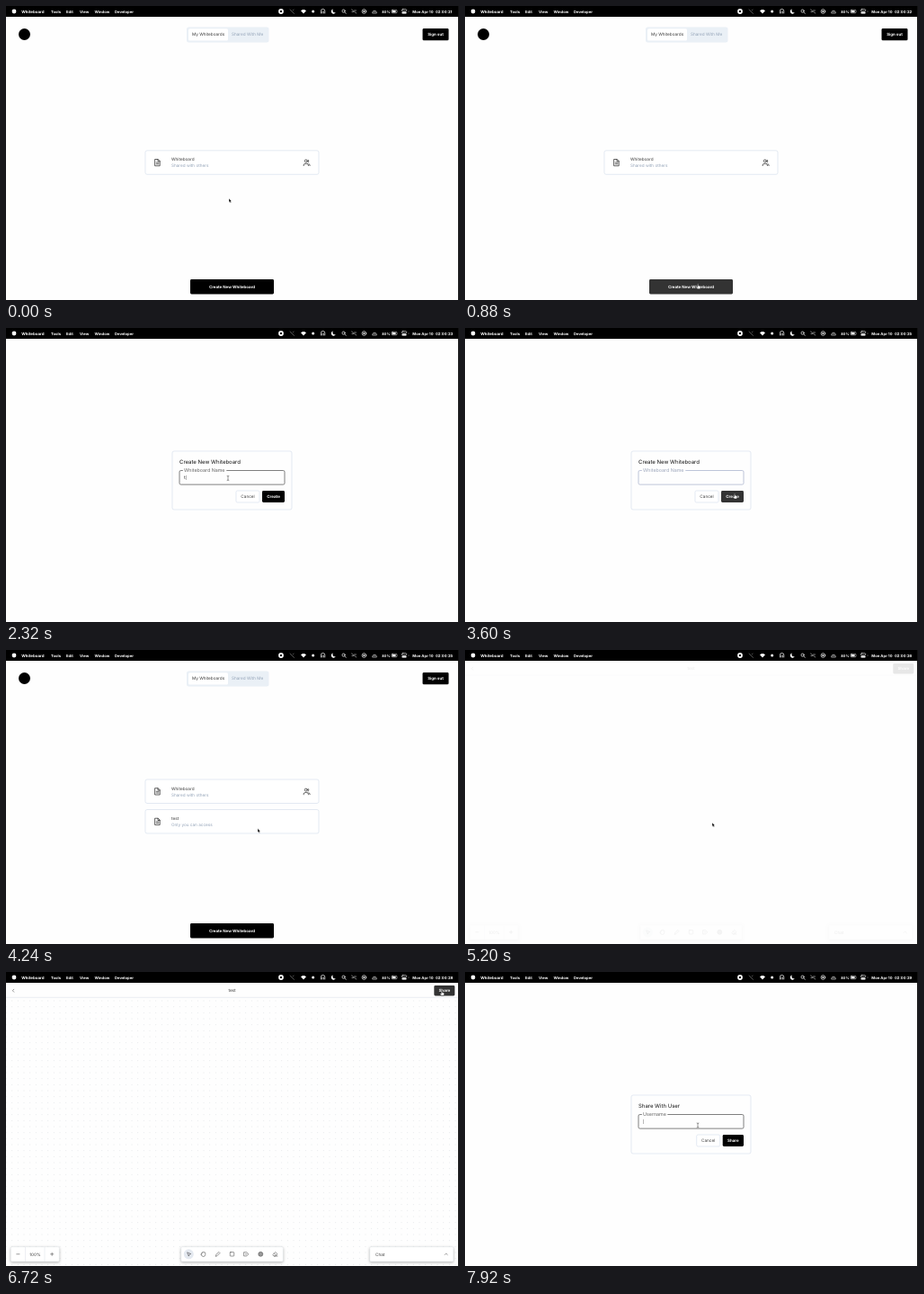
An HTML page that plays this animation: 504 by 327 pixels, repeating every 8 s.

```html
<!DOCTYPE html>
<html lang="en">
<head>
<meta charset="utf-8">
<title>Whiteboard</title>
<style>
html, body { margin: 0; width: 100%; height: 100%; overflow: hidden; background: #fefefe; }
svg { display: block; width: 504px; height: 327px; }
text {
  font-family: Inter, "Open Sans", sans-serif; font-size: 4.67px; fill: #3c3c3c;
  white-space: pre; text-rendering: geometricPrecision;
}
.bold { font-weight: 700; }
.mid { text-anchor: middle; }
.menu text { font-size: 4.2px; fill: #fff; font-weight: 650; }
.menu .app { font-weight: 700; font-size: 4.4px; }
.line { fill: none; stroke: #222; stroke-width: .7; stroke-linecap: round; stroke-linejoin: round; }
.menu .line { stroke: #fff; }
.thin .line { stroke: #333; stroke-width: .5; }
.soft { fill: #94a3b8; }
.card { fill: #fff; stroke: #d9e1ee; stroke-width: .7; }
.panel { fill: #fff; stroke: #dfe2e7; stroke-width: .4; filter: drop-shadow(0 1px 1.7px rgba(0,0,0,.3)); }
</style>
</head>
<body>
<svg id="stage" viewBox="0 0 504 327"></svg>
<script>
const LOOP = 8000;
const GRID = 20 / 3;
const text = (x, y, s, attrs = '') => `<text x="${x}" y="${y}" ${attrs}>${s}</text>`;
const rect = (x, y, w, h, r, attrs = '') =>
  `<rect x="${x}" y="${y}" width="${w}" height="${h}" rx="${r}" ${attrs}/>`;
const dot = (x, y, r, attrs = '') => `<circle cx="${x}" cy="${y}" r="${r}" ${attrs}/>`;
const line = (d, attrs = '') => `<path class="line" d="${d}" ${attrs}/>`;
const group = (id, body, attrs = '') => `<g id="${id}" ${attrs}>${body}</g>`;

const button = (id, x, y, w, h, label, size = 4.5) =>
  rect(x, y, w, h, 1.4, `id="${id}" fill="#000"`) +
  text(x + w / 2, y + h / 2 + 1.6, label, `class="bold mid" style="fill:#fff;font-size:${size}px"`);

const menu = () => rect(0, 0, 504, 12, 0, 'fill="#000"') +
  dot(9, 6, 2.4, 'fill="#fff"') +
  text(17.3, 7.6, 'Whiteboard', 'class="app"') +
  [[50, 'Tools'], [67, 'Edit'], [82, 'View'], [98.5, 'Window'], [121, 'Developer']]
    .map(([x, s]) => text(x, 7.6, s)).join('') +
  dot(306, 6, 2.9, 'fill="#fff"') + rect(305, 5, 2, 2, .3, 'fill="#000"') +
  line('M316 4l4.5 4.5M320 4l-1 1', 'opacity=".45"') +
  '<path fill="#fff" d="M331 8.6l-3-3.4q3-2.4 6 0z"/>' +
  dot(341.7, 6, 1.5, 'fill="#fff"') +
  line('M350.4 8V5.6a2.2 2.2 0 0 1 4.4 0V8M351.8 8V6M353.4 8V6') +
  '<path fill="#fff" d="M363.8 3.6a2.6 2.6 0 1 0 3 3.5a2.4 2.4 0 0 1-3-3.5z"/>' +
  dot(375.6, 5.6, 1.6, 'class="line"') + line('M376.9 6.9l1.3 1.4') +
  line('M384.6 4l5.2 4M385 6.5h1.5M387.5 5h2', 'opacity=".7"') +
  dot(398.4, 6, 2.3, 'class="line"') + dot(398.4, 6, 1, 'fill="#fff"') +
  line('M407.6 7.6a2.4 2.4 0 0 1 4.8 0zM410 7v-1', 'opacity=".8"') +
  text(418.3, 7.5, '80%', 'style="font-size:3.9px"') +
  rect(429, 4.3, 6, 3.5, 1, 'class="line" style="stroke-width:.5"') +
  rect(429.6, 4.9, 4, 2.3, .5, 'fill="#fff"') +
  rect(440.3, 3.6, 5.4, 2.2, 1.1, 'class="line" style="stroke-width:.6"') +
  rect(440.3, 6.4, 5.4, 2.2, 1.1, 'fill="#fff"') + dot(448, 6, .5, 'fill="#aaa"') +
  text(452.3, 7.6, 'Mon Apr 10') + text(478, 7.6, '', 'id="clock"');

const boardCard = (id, y, title, note, shared) => group(id,
  rect(155, y, 193, 26.5, 2, 'class="card"') +
  line(`M166 ${y + 9.7}h3.2l2 2v5.3h-5.2zM169 ${y + 9.8}v2.2h2.1M167.2 ${y + 13.3}h2.7M167.2 ${y + 15}h2.7`) +
  text(184, y + 11.6, title) + text(184, y + 18.6, note, 'class="soft"') +
  (shared ? dot(333.8, y + 11.6, 1.5, 'class="line"') +
    line(`M331.2 ${y + 16.8}v-.6q0-1.6 1.6-1.6h2q1.6 0 1.6 1.6v.6M336.2 ${y + 10.2}q1.5.5 0 2.9M337 ${y + 14.7}q1.2.4 1.2 2`) : ''));

const home = () => dot(20.5, 31.5, 6.5, 'fill="#000"') +
  rect(201, 23.5, 91.5, 17, 2, 'fill="#eaf0f6"') +
  rect(203, 25.3, 44, 13.3, 1.5, 'fill="#fff"') +
  text(207, 33.4, 'My Whiteboards') + text(251, 33.4, 'Shared With Me', 'class="soft"') +
  button('signOut', 463.5, 25, 29, 13.3, 'Sign out', 4.4) +
  boardCard('first', 0, 'Whiteboard', 'Shared with others', true) +
  boardCard('second', 177.5, 'test', 'Only you can access', false) +
  button('newBoard', 205, 304, 93, 16.5, 'Create New Whiteboard', 4.4);

const tools = () => dot(203.3, 313.8, 5.5, 'fill="#e4e9f0"') +
  line('M202 312l3.6 1.5l-1.6.6l-.6 1.6z') +
  line('M217.6 313.8v-1.3q.6-.6 1 0v-.9q.6-.7 1.1 0v.2q.6-.6 1.1 0v.4q.7-.5 1 .1v2q-.3 2.2-2.2 2.2t-2.7-2.2z') +
  line('M233.4 316l.4-1.6l3-3l1.2 1.2l-3 3z') +
  rect(249.3, 311.6, 4.4, 4.4, .6, 'class="line"') +
  line('M265 311.7h2.8l2 2.1l-2 2.1h-2.8zM266.4 313.8h1.5') +
  dot(283.3, 313.8, 2.5, 'fill="#999" stroke="#444" stroke-width=".5"') +
  line('M297 314.3l2.8-2.8l2.2 2.2l-2.3 2.3h-1.2zM298.4 312.9l2.2 2.2M298.5 316h3.5');

const board = () =>
  rect(0, 12, 503, 315, 0, 'fill="#fefefe"') +
  rect(0, 28, 503, 299, 0, 'id="dots" fill="url(#grid)"') +
  rect(0, 12, 503, 16, 0, 'fill="#fefefe"') +
  '<path d="M0 28.3H503" stroke="#e2e6ed" stroke-width=".7"/>' +
  line('M8.8 19.2l-1.5 1.5l1.5 1.5') +
  text(251.5, 22.2, 'test', 'class="mid"') +
  button('share', 476.3, 15, 23, 11.5, 'Share') +
  rect(5.3, 305.7, 54, 16.3, 1.5, 'class="panel"') +
  '<path d="M21.5 306v16M43 306v16" stroke="#e1e5eb" stroke-width=".6"/>' +
  line('M11.8 313.8h3.2M49.6 313.8h3.2M51.2 312.2v3.2') +
  text(32.3, 315.5, '100%', 'class="mid"') +
  rect(194.8, 305.7, 113.5, 16.3, 1.5, 'class="panel"') + tools() +
  rect(404.8, 305.7, 93, 16.3, 1.5, 'class="panel"') +
  text(411, 315.5, 'Chat') + line('M488.2 314.5l1.5-1.5l1.5 1.5');

// Dialog with one text field; ids share a prefix.
const dialog = (id, title, label, labelWidth, ok, okX) => {
  const cancelW = 26, cancelX = okX - cancelW - 3;
  return group(id,
    rect(185, 137, 133, 65, 2, 'class="card" style="fill:none"') +
    text(193, 150.8, title, 'style="font-size:6px;fill:#111"') +
    rect(193, 158.5, 117, 15.6, 1.6, `id="${id}Box" fill="none"`) +
    rect(196.8, 157.5, labelWidth, 2.2, 0, `id="${id}Gap" fill="#fefefe"`) +
    text(198, 0, label, `id="${id}Label" style="font-size:5.33px"`) +
    text(198, 168.3, '', `id="${id}Value" style="font-size:5.33px"`) +
    rect(0, 163.8, .4, 5.2, 0, `id="${id}Caret" fill="#555"`) +
    rect(cancelX, 181, cancelW, 13, 1.6, 'class="card"') +
    text(cancelX + cancelW / 2, 189.2, 'Cancel', 'class="mid"') +
    button(id + 'Ok', okX, 181, 310 - okX, 13, ok));
};

const cursors = () => group('pointer',
  group('arrow', '<path d="M0 0v4.4l1-.9l.7 1.6l.8-.4l-.7-1.5h1.3z" fill="#000" stroke="#fff" stroke-width=".4"/>') +
  group('hand', '<path d="M-.5-1.2q.5-.6 1 0v2l2 .6q.6.3.4 1.2l-.5 1.8h-2.7l-1.7-2q.1-.8 1.5.1z" fill="#fff" stroke="#000" stroke-width=".4"/>') +
  group('beam', line('M-.9-2.6q.9 0 .9.6v4q0 .6-.9.6M.9-2.6q-.9 0-.9.6M0 2q0 .6.9.6', 'style="stroke-width:.45"')));

const stage = document.getElementById('stage');
stage.innerHTML =
  `<defs><pattern id="grid" x="${-GRID / 2}" y="${12 - GRID / 2}" width="${GRID}" height="${GRID}" patternUnits="userSpaceOnUse">` +
  dot(GRID / 2, GRID / 2, .4, 'fill="#ccced4"') + '</pattern></defs>' +
  rect(0, 0, 504, 327, 0, 'fill="#fefefe"') +
  group('home', home()) + group('board', board(), 'class="thin"') +
  dialog('create', 'Create New Whiteboard', 'Whiteboard Name', 48.5, 'Create', 285) +
  dialog('invite', 'Share With User', 'Username', 28.5, 'Share', 286.7) +
  group('menu', menu(), 'class="menu"') +
  rect(503, 0, 1, 327, 0, 'fill="#111"') + cursors();

const $ = Object.fromEntries([...stage.querySelectorAll('[id]')].map(e => [e.id, e]));
const set = (el, attrs) => { for (const k in attrs) el.setAttribute(k, attrs[k]); };
const show = (el, on) => { el.style.display = on ? '' : 'none'; };
const fade = (el, a) => { el.style.opacity = a; show(el, a > 0); };
const ramp = (t, from, to) => Math.min(1, Math.max(0, (t - from) / (to - from)));
const easeOut = p => 1 - (1 - p) ** 3;
const smooth = p => p * p * (3 - 2 * p);

// Pointer stops: time, x, y
const path = [
  [0, 248, 214], [80, 248, 214], [720, 258, 306], [1100, 261, 317], [1480, 261, 317],
  [1720, 247, 167], [2900, 247, 167], [3400, 300, 185.5], [3640, 300, 185.5],
  [4160, 280, 198.5], [4300, 280, 198.5], [4640, 275, 192], [5360, 275, 192],
  [5760, 502.3, 0], [6320, 502.3, 0], [6640, 484.7, 21.8], [6960, 484.7, 21.8],
  [7340, 259, 170.5], [8000, 259, 170.5]
];
function pointerAt(t) {
  const i = Math.max(1, path.findIndex(k => k[0] >= t));
  const [a, b] = [path[i - 1], path[i]];
  const p = smooth(ramp(t, a[0], b[0]));
  return [a[1] + (b[1] - a[1]) * p, a[2] + (b[2] - a[2]) * p];
}

function drawDialog(id, p, focus, value, blinkOn, blurred) {
  fade($[id], p);
  set($[id], { transform: `translate(251.5 169.5) scale(${p}) translate(-251.5 -169.5)` });
  const active = focus > 0 && !blurred;
  set($[id + 'Box'], {
    stroke: active ? '#4a4a4a' : blurred ? '#a3adc9' : '#d6dfee',
    'stroke-width': .7
  });
  show($[id + 'Gap'], focus > .5);
  set($[id + 'Label'], { y: 168.3 - 7.9 * focus });
  $[id + 'Label'].style.fill = active ? '#666' : '#9ca6bb';
  $[id + 'Value'].textContent = value;
  set($[id + 'Caret'], { x: 198.3 + [0, 2, 5, 7.8, 9.8][value.length] });
  show($[id + 'Caret'], active && blinkOn);
}

function draw(t) {
  const [x, y] = pointerAt(t);
  const over = (l, top, r, b) => x > l && x < r && y > top && y < b;

  const create = t < 3640 ? easeOut(ramp(t, 1280, 1680)) : 1 - easeOut(ramp(t, 3640, 4000));
  const invite = easeOut(ramp(t, 6960, 7340));
  const boardIn = smooth(ramp(t, 5140, 5480));

  fade($.home, (1 - create) * (1 - ramp(t, 4920, 5140)));
  const added = t >= 3640;
  set($.first, { transform: `translate(0 ${added ? 144 : 160.8})` });
  show($.second, added);
  fade($.board, boardIn * (1 - invite));
  $.dots.style.opacity = ramp(t, 5320, 5680);

  const typed = 'test'.slice(0, [2240, 2400, 2560, 2680].filter(k => t >= k).length);
  drawDialog('create', create, easeOut(ramp(t, 1840, 2000)), t < 3560 ? typed : '',
    t < 2900 || t % 1000 < 500, t >= 3560);
  drawDialog('invite', invite, easeOut(ramp(t, 7440, 7600)), '', true, false);

  const onNew = t < 1280 && over(205, 304, 298, 321);
  const onOk = t > 2900 && t < 3700 && over(285, 181, 310, 194);
  const onShare = t > 6300 && t < 7000 && over(476, 14, 500, 27);
  const onCard = t > 4300 && t < 5140 && over(155, 177, 348, 197);
  set($.newBoard, { fill: onNew ? '#333' : '#000' });
  set($.createOk, { fill: onOk ? '#333' : '#000' });
  set($.share, { fill: onShare ? '#333' : '#000' });

  const beam = (create > .9 || invite > .9) && over(193, 158, 310, 174);
  const hand = onNew || onOk || onShare || onCard;
  show($.beam, beam);
  show($.hand, hand && !beam);
  show($.arrow, !hand && !beam);
  set($.pointer, { transform: `translate(${x} ${y})` });

  $.clock.textContent = '02:00:' + (21 + Math.floor((t + 660) / 1000));
}

const start = performance.now();
function tick() {
  draw((performance.now() - start) % LOOP);
  requestAnimationFrame(tick);
}
tick();
</script>
</body>
</html>
```
